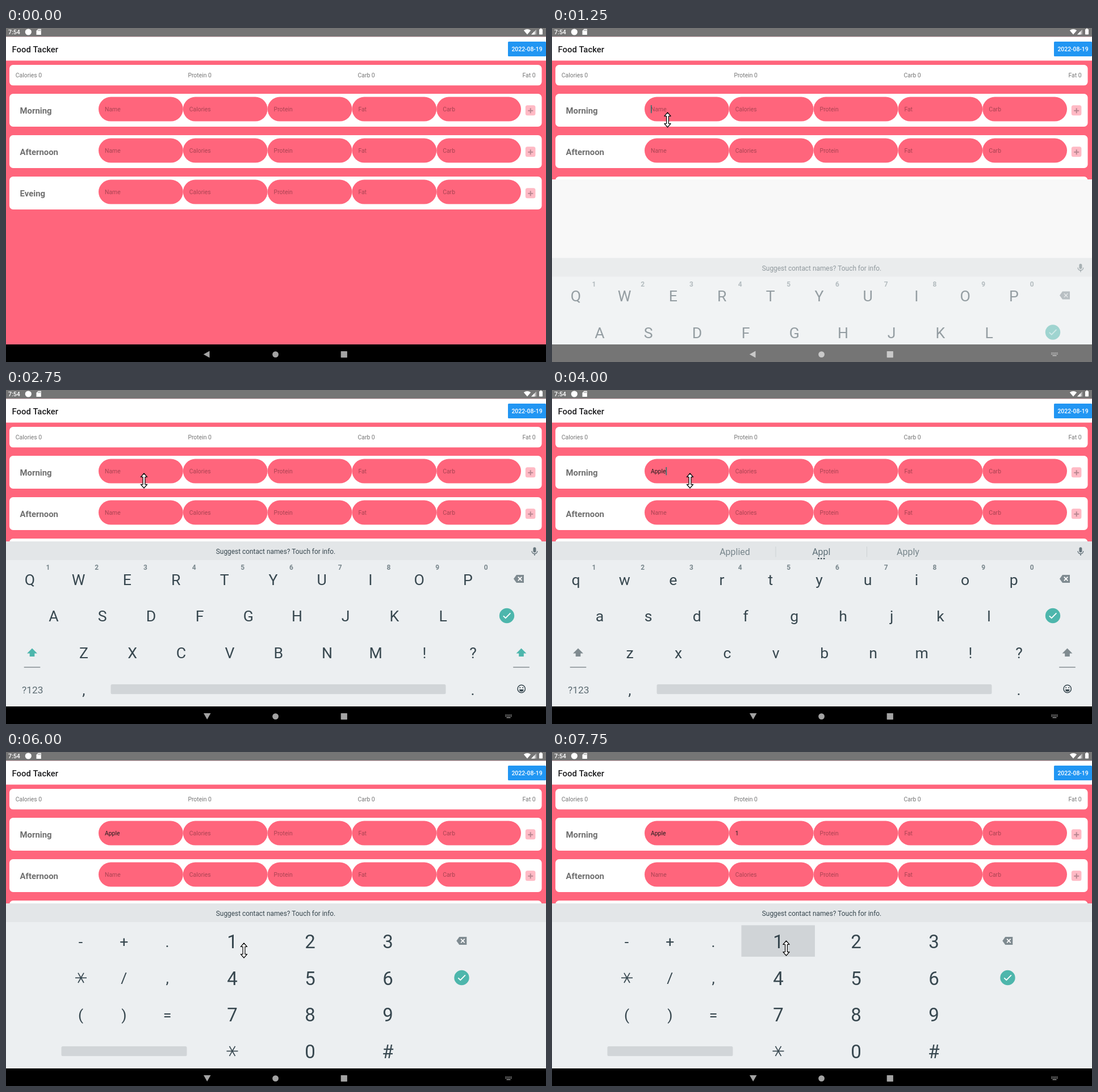
An HTML page with a canvas that plays this animation: 951 px wide and 589 px high, repeating every 8000 ms.

```html
<!DOCTYPE html>
<html lang="en">
<head>
<meta charset="utf-8">
<title>Food diary</title>
<style>
html, body { margin: 0; width: 100%; height: 100%; overflow: hidden; background: #ff657c; }
canvas { display: block; width: 100vw; height: 100vh; }
</style>
</head>
<body>
<canvas id="stage" width="951" height="589"></canvas>
<script>
const ctx = document.getElementById('stage').getContext('2d');
const LOOP = 8000, TICK = 250;
const PINK = '#ff657c', TEAL = '#4db6ac', INK = '#37474f', GREY = '#7f8b91';
const FIELDS = ['Name', 'Calories', 'Protein', 'Fat', 'Carb'];
const KEYS_TOP = 267, NAV_TOP = 558;

// Pointer stops: [time, x, y]; each holds until the next.
const POINTER = [
  [250, 420, 500], [500, 330, 330], [750, 225, 190], [1000, 202, 162],
  [1250, 203.5, 162], [1500, 228, 161], [1750, 243, 160], [4500, 262, 157],
  [4750, 315, 150], [5000, 352, 146], [5250, 366, 145], [5500, 440, 145],
  [5750, 553, 136], [6000, 419, 350], [6250, 418, 349], [6500, 416, 348],
  [6750, 414, 347], [7000, 412.5, 346]
];
const TYPED = [[0, ''], [3250, 'A'], [3500, 'Ap'], [3750, 'Appl'], [4000, 'Apple']];
const HINTS = [
  [0, null], [3250, ['And', 'A', 'At']], [3500, ['App', 'Ap', 'April']],
  [3750, ['Apply', 'App', 'Apps']], [4000, ['Applied', 'Appl', 'Apply']],
  [4250, ['Apples', 'Apple', 'Applied']], [5250, null]
];
const CARET = [
  [0, false], [1250, true], [1750, false], [2250, true], [2750, false], [3250, true],
  [4500, false], [4750, true], [6000, false], [6500, true], [7000, false],
  [7500, true], [7750, false]
];

function at(list, t) {
  let found = null;
  for (const item of list) if (item[0] <= t) found = item;
  return found;
}

function rect(x, y, w, h, color, r = 0) {
  ctx.fillStyle = color;
  ctx.beginPath();
  ctx.roundRect(x, y, w, h, r);
  ctx.fill();
}

function disc(x, y, r, color) {
  ctx.fillStyle = color;
  ctx.beginPath();
  ctx.arc(x, y, r, 0, 7);
  ctx.fill();
}

function poly(points, color) {
  ctx.fillStyle = color;
  ctx.beginPath();
  points.forEach(([x, y]) => ctx.lineTo(x, y));
  ctx.closePath();
  ctx.fill();
}

function line(points, color, width) {
  ctx.strokeStyle = color;
  ctx.lineWidth = width;
  ctx.beginPath();
  points.forEach(([x, y], i) => i ? ctx.lineTo(x, y) : ctx.moveTo(x, y));
  ctx.stroke();
}

function text(s, x, y, size, color, align = 'left', weight = 400) {
  ctx.font = `${weight} ${size}px Roboto, sans-serif`;
  ctx.fillStyle = color;
  ctx.textAlign = align;
  ctx.fillText(s, x, y);
}

function statusBar() {
  rect(0, 0, 951, 15.5, '#757575');
  text('7:54', 4, 10.7, 10.6, '#fff', 'left', 500);
  disc(39.3, 7, 5.6, '#fff');
  poly([[53.5, 5], [56.5, 1.8], [61.8, 1.8], [61.8, 12], [53.5, 12]], '#fff');
  for (let i = 0; i < 3; i++) rect(56.2 + i * 1.8, 3.2, 0.9, 2, '#757575');
  ctx.fillStyle = '#fff';
  ctx.beginPath();
  ctx.moveTo(918, 11.5);
  ctx.lineTo(911.8, 4.2);
  ctx.quadraticCurveTo(918, -0.4, 924.2, 4.2);
  ctx.fill();
  poly([[925, 11.5], [934, 2.5], [934, 11.5]], '#b5b5b5');
  poly([[925, 11.5], [931, 5.5], [931, 11.5]], '#fff');
  rect(939, 2, 6, 9.5, '#fff', 0.8);
  rect(940.8, 0.8, 2.4, 2, '#fff');
}

function mealRow(title, y, values) {
  rect(6, y, 937.5, 58, '#fff', 6.5);
  text(title, 24.6, y + 35.3, 14.86, '#6f6f6f', 'left', 700);
  FIELDS.forEach((name, i) => {
    const x = 163 + i * 148.8, value = values[i];
    rect(x, y + 5.6, 148.8, 43, PINK, 21.5);
    text(value || name, x + 11, y + 31, 10.4, value ? '#1c1c1c' : 'rgba(0,0,0,.34)');
  });
  rect(914.8, y + 20.2, 17.6, 18, '#ffbac5', 3.5);
  line([[919.2, y + 29.8], [928.2, y + 29.8]], '#b88791', 2);
  line([[923.7, y + 25.3], [923.7, y + 34.3]], '#b88791', 2);
}

function app(values) {
  rect(0, 0, 951, 589, PINK);
  statusBar();
  rect(0, 15.5, 951, 42, '#fff');
  text('Food Tacker', 10.5, 42.5, 14.86, '#1c1c1e', 'left', 500);
  rect(884, 24, 67, 26, '#2196f3', 1.5);
  text('2022-08-19', 917.5, 41.3, 10.4, '#fff', 'center', 500);

  rect(6, 65, 937.5, 36.3, '#fff', 6.5);
  text('Calories 0', 16.8, 87.3, 10.4, '#757575');
  text('Protein 0', 320.4, 87.3, 10.4, '#757575');
  text('Carb 0', 619.5, 87.3, 10.4, '#757575');
  text('Fat 0', 932.5, 87.3, 10.4, '#757575', 'right');

  mealRow('Morning', 116, values);
  mealRow('Afternoon', 189, []);
  mealRow('Eveing', 262, []);
}

function navBar(open, fading) {
  const color = fading ? '#c9c9c9' : '#a3a3a3';
  rect(0, NAV_TOP, 951, 31, fading ? '#757575' : '#000');
  if (open && !fading) poly([[348, 570], [360.5, 570], [354.2, 581]], color);
  else poly([[358.5, 569.5], [358.5, 581.5], [347.8, 575.5]], color);
  disc(474.6, 575.6, 5.4, color);
  rect(589.7, 570, 11.2, 11.2, color, 0.6);
  if (!open) return;
  for (let r = 0; r < 2; r++)
    for (let c = 0; c < 5; c++) rect(879.2 + c * 2.5, 572.2 + r * 2.4, 1.5, 1.4, color);
  rect(881.5, 577, 7, 1.4, color);
}

function backspace(x, y) {
  poly([[x - 9, y], [x - 4, y - 7], [x + 9, y - 7], [x + 9, y + 7], [x - 4, y + 7]], GREY);
  for (const s of [-1, 1])
    line([[x - 1.2, y - 3.3 * s], [x + 5.4, y + 3.3 * s]], '#fff', 1.7);
}

function enterKey(x, y) {
  disc(x, y, 13.2, TEAL);
  line([[x - 6.2, y + 0.3], [x - 2.2, y + 4.2], [x + 6.4, y - 4.6]], '#fff', 1.8);
}

function shiftKey(x, color) {
  poly([[x, 455.5], [x + 9, 464.5], [x + 4.3, 464.5], [x + 4.3, 470], [x - 4.3, 470],
    [x - 4.3, 464.5], [x - 9, 464.5]], color);
  rect(x - 14.3, 488, 28.6, 1.7, '#91999d');
}

function mic() {
  rect(928.4, 277.3, 5, 9.3, '#66757c', 2.5);
  ctx.strokeStyle = '#66757c';
  ctx.lineWidth = 1.4;
  ctx.beginPath();
  ctx.arc(930.9, 284, 4.8, 0, Math.PI);
  ctx.stroke();
  line([[930.9, 288.8], [930.9, 292]], '#66757c', 1.5);
}

function smiley(x, y) {
  ctx.strokeStyle = INK;
  ctx.lineWidth = 1.5;
  ctx.beginPath();
  ctx.arc(x, y, 6.7, 0, 7);
  ctx.stroke();
  disc(x - 2.5, y - 2, 1.1, INK);
  disc(x + 2.5, y - 2, 1.1, INK);
  ctx.fillStyle = INK;
  ctx.beginPath();
  ctx.arc(x, y + 0.9, 3.8, 0, Math.PI);
  ctx.fill();
}

function star(x, y, r) {
  for (let i = 0; i < 3; i++) {
    const a = i * Math.PI / 3, dx = Math.cos(a) * r, dy = Math.sin(a) * r;
    line([[x - dx, y - dy], [x + dx, y + dy]], INK, 1.7);
  }
}

function strip(hints) {
  rect(0, KEYS_TOP, 951, 291, '#eceff1');
  rect(0, KEYS_TOP, 951, 33, '#e3e6e8');
  if (!hints) {
    text('Suggest contact names? Touch for info.', 475, 289.2, 11.89, INK, 'center');
    return;
  }
  hints.forEach((word, i) =>
    text(word, [322, 474.3, 627][i], 291, 16, i === 1 ? '#5f7078' : '#78868c', 'center'));
  for (const x of [393.5, 554]) rect(x, 276, 1, 18.5, '#cdd2d4');
  for (let i = -1; i < 2; i++) disc(474.2 + i * 5, 297.3, 1.3, INK);
}

function letterKeys(upper) {
  const rows = [['qwertyuiop', 42], ['asdfghjkl', 84], ['zxcvbnm!?', 137]];
  rows.forEach(([keys, x0], r) => [...keys].forEach((k, i) =>
    text(upper ? k.toUpperCase() : k, x0 + i * 85.7, 343.5 + r * 64.8, 26.7, INK, 'center')));
  [...'1234567890'].forEach((d, i) =>
    text(d, 74 + i * 85.7, 317.4, 12, '#78868c', 'center', 700));
  backspace(903, 333);
  enterKey(882, 398);
  for (const x of [46, 907.5]) shiftKey(x, upper ? TEAL : '#808b90');
  text('?123', 46.7, 534.7, 17.3, '#5c6b72', 'center');
  text(',', 137, 538, 26.7, INK, 'center');
  text('.', 822, 538, 26.7, INK, 'center');
  rect(184.5, 519, 590, 17.2, '#d1d5d8', 2.5);
  smiley(907.7, 527);
  mic();
}

function numberKeys(pressed) {
  if (pressed) rect(333.5, 305.5, 129.5, 55.5, '#d0d4d7');
  ['-+.', ' /,', '()='].forEach((keys, r) => [...keys].forEach((k, i) =>
    text(k, 131.5 + i * 76.3, 343.5 + r * 64.8, 26.7, INK, 'center')));
  ['123', '456', '789', ' 0#'].forEach((keys, r) => [...keys].forEach((k, i) =>
    text(k, 398.5 + i * 137, 346 + r * 64.7, 33, INK, 'center')));
  star(132, 398.3, 10);
  star(398.5, 527.5, 10);
  rect(97.5, 519, 221, 17.2, '#d1d5d8', 2.5);
  backspace(802.3, 333);
  enterKey(802.5, 398);
}

function keyboard(t) {
  const fading = t < 1500;
  ctx.save();
  ctx.beginPath();
  ctx.rect(0, KEYS_TOP, 951, NAV_TOP - KEYS_TOP);
  ctx.clip();
  if (fading) {
    rect(0, KEYS_TOP, 951, 291, '#f8f8f8');
    ctx.globalAlpha = 0.5;
    ctx.translate(0, 138.5);
  }
  strip(at(HINTS, t)[1]);
  if (t < 5250) letterKeys(t < 3250);
  else numberKeys(t >= 7500);
  ctx.restore();
}

function pointer(x, y) {
  const half = [[0, -13], [5.6, -6.6], [1.9, -6.6], [1.9, 6.6], [5.6, 6.6], [0, 13]];
  const back = half.slice(1, -1).reverse().map(([px, py]) => [-px, py]);
  ctx.save();
  ctx.translate(x, y);
  poly([...half, ...back], '#fff');
  ctx.strokeStyle = '#000';
  ctx.lineWidth = 1.2;
  ctx.lineJoin = 'round';
  ctx.stroke();
  ctx.restore();
}

function draw(t) {
  const name = at(TYPED, t)[1];
  const open = t >= 1250;
  app([name, t >= 7750 ? '1' : '']);
  if (at(CARET, t)[1]) {
    ctx.font = '400 10.4px Roboto, sans-serif';
    const x = t < 5250 ? 174 + ctx.measureText(name).width : 322.8;
    rect(x, 136, 1.5, 14.2, '#1f7670');
  }
  if (open) keyboard(t);
  navBar(open, open && t < 1500);
  const stop = at(POINTER, t);
  if (stop) pointer(stop[1], stop[2]);
}

const start = performance.now();
function loop() {
  const t = (performance.now() - start) % LOOP;
  draw(Math.floor(t / TICK) * TICK);
  requestAnimationFrame(loop);
}
loop();
</script>
</body>
</html>
```
